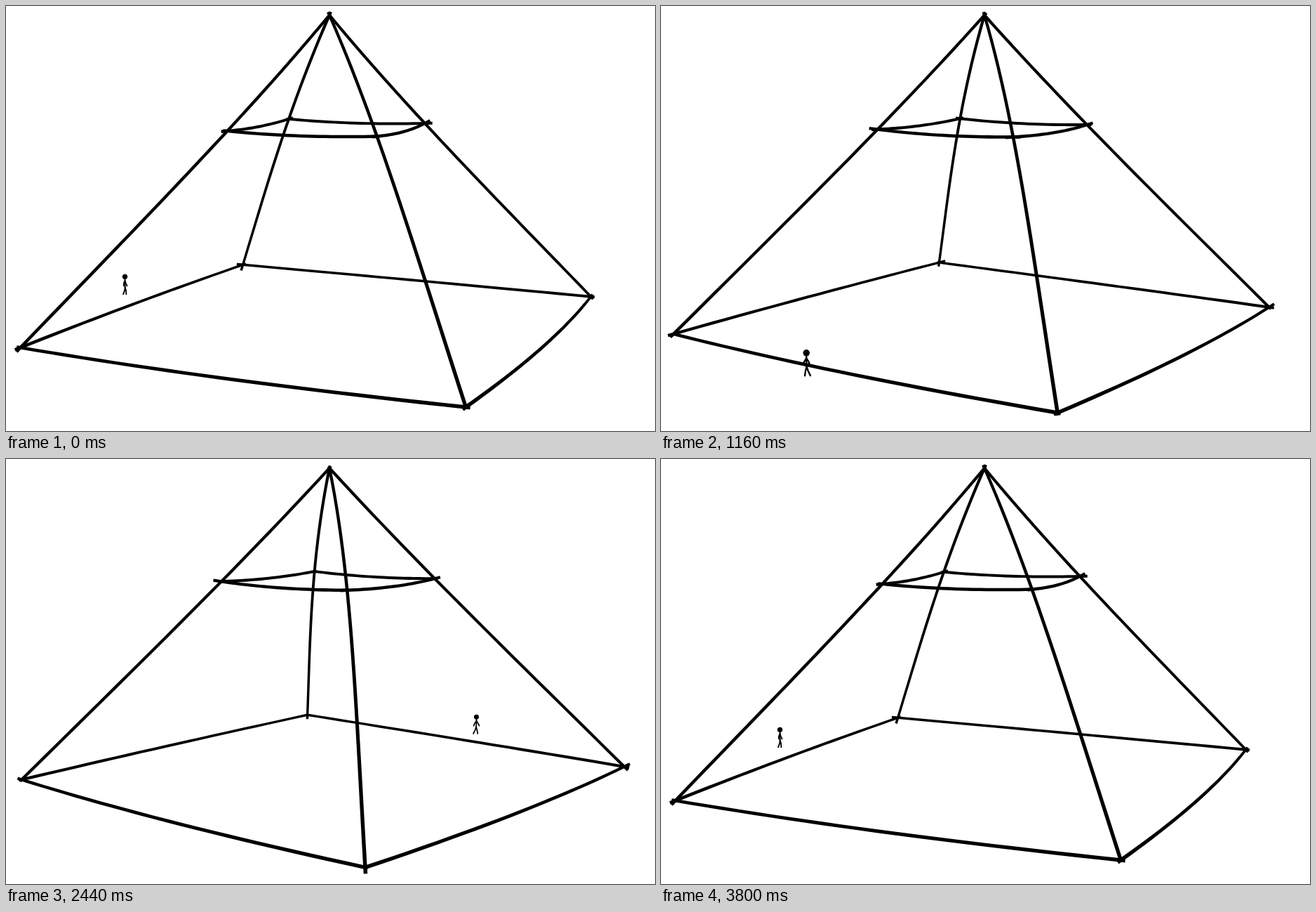
An HTML page with a canvas that plays this animation: 925x605 px, repeating every 3840 ms.

```html
<!DOCTYPE html>
<html>
<head>
<meta charset="utf-8">
<title>Turning pyramid</title>
<style>
html, body { margin: 0; width: 100%; height: 100%; overflow: hidden; background: #fff; }
canvas { display: block; }
</style>
</head>
<body>
<canvas id="stage" width="925" height="605"></canvas>
<script>
const ctx = document.getElementById('stage').getContext('2d');
const STEP = 40, FRAMES = 96, LAST = FRAMES - 1;
const CENTER = 461, SIZE = 431, DEPTH = 0.2386;
const RING_DROP = 0.367, RING_RADIUS = 0.357, RING_TWIST = 3.5;
const START = 20.5, INK = 4.2;
const rad = deg => deg * Math.PI / 180;

// x to the right, z towards the viewer, drop = 0 at the apex and 1 on the ground
function project(x, z, drop) {
  const s = 1 / (1 - DEPTH * z);
  return { x: CENTER + SIZE * x * s, y: 13 + 3 * drop + SIZE * drop * s, s };
}

// Moves the end point a outwards, away from its neighbour b
function extend(a, b, length) {
  const d = Math.hypot(a.x - b.x, a.y - b.y) || 1;
  return { x: a.x + (a.x - b.x) / d * length, y: a.y + (a.y - b.y) / d * length, s: a.s };
}

// Pen line whose width follows the distance, overshooting at both ends
function penLine(curve, before, after) {
  const n = 24;
  const p = Array.from({ length: n + 1 }, (_, i) => curve(i / n));
  p.unshift(extend(p[0], p[1], before));
  p.push(extend(p[n + 1], p[n], after));
  const side = sign => p.map((q, i) => {
    const a = p[Math.max(i - 1, 0)], b = p[Math.min(i + 1, p.length - 1)];
    const d = Math.hypot(b.x - a.x, b.y - a.y) || 1, w = sign * INK * q.s / 2 / d;
    return [q.x - (b.y - a.y) * w, q.y + (b.x - a.x) * w];
  });
  ctx.beginPath();
  for (const [x, y] of [...side(1), ...side(-1).reverse()]) ctx.lineTo(x, y);
  ctx.fill();
}

// Edge from the apex to a ground corner, twisted and pulled in along the way
function slope(angle, from, to) {
  penLine(t => {
    const twist = 0.122 * t * (1 - t) * (1 - 0.65 * t), radius = t - twist / 2;
    return project(radius * Math.sin(angle) + twist * Math.cos(angle),
                   radius * Math.cos(angle) - twist * Math.sin(angle), t);
  }, from, to);
}

function squareSide(angle, radius, drop, bulge, sag, from, to) {
  const next = angle + Math.PI / 2, mid = angle + Math.PI / 4;
  penLine(v => {
    const arch = 4 * v * (1 - v);
    const mix = f => radius * (f(angle) * (1 - v) + f(next) * v) + bulge * arch * f(mid);
    const q = project(mix(Math.sin), mix(Math.cos), drop);
    q.y += sag * arch;
    return q;
  }, from, to);
}

function walker(turn) {
  const a = turn - rad(117), foot = project(0.827 * Math.sin(a), 0.827 * Math.cos(a), 0.997);
  const b = turn + rad(30);
  // side, forward, height
  const at = ([side, forward, up]) =>
    [foot.x + foot.s * (side * Math.sin(b) + forward * Math.cos(b)), foot.y - foot.s * up];
  const limb = (...joints) => {
    ctx.beginPath();
    joints.forEach(j => ctx.lineTo(...at(j)));
    ctx.stroke();
  };
  ctx.lineWidth = 2 * foot.s;
  const neck = [0, 0, 21], hip = [0.3, 0, 11];
  limb([0, 0, 27], neck, hip);
  limb(neck, [-2.8, -0.5, 17], [-4.6, 0.5, 13]);
  limb(neck, [2.8, 0, 17], [4.7, 1, 13]);
  limb(hip, [-1, 0, 6], [-2.6, -1.6, 0]);
  limb(hip, [2.3, 0.5, 6], [5, -0.5, 0]);
  ctx.beginPath();
  ctx.arc(...at([0, 0, 27.3]), 4 * foot.s, 0, 2 * Math.PI);
  ctx.fill();
}

function draw(frame) {
  const u = frame / LAST;
  const turn = 2 * Math.PI * u * u * (3 - 2 * u);
  let seed = (frame % LAST) * 31 + 1;
  const random = (low, high) => {
    const r = Math.sin(seed++ * 12.9898) * 43758.5453;
    return low + (high - low) * (r - Math.floor(r));
  };
  ctx.fillStyle = '#fff';
  ctx.fillRect(0, 0, 925, 605);
  ctx.fillStyle = ctx.strokeStyle = '#000';
  ctx.lineCap = ctx.lineJoin = 'round';
  for (let k = 0; k < 4; k++) {
    const angle = turn + rad(START + 90 * k);
    slope(angle, random(1, 5), random(2, 10));
    squareSide(angle, 1, 1, 0.021, 1.5, random(1, 9), random(1, 9));
    squareSide(angle + rad(RING_TWIST), RING_RADIUS, RING_DROP, 0.005, 3,
               random(1, 13), random(1, 13));
  }
  walker(turn);
}

function tick() {
  draw(Math.floor(performance.now() / STEP) % FRAMES);
  requestAnimationFrame(tick);
}
tick();
</script>
</body>
</html>
```
